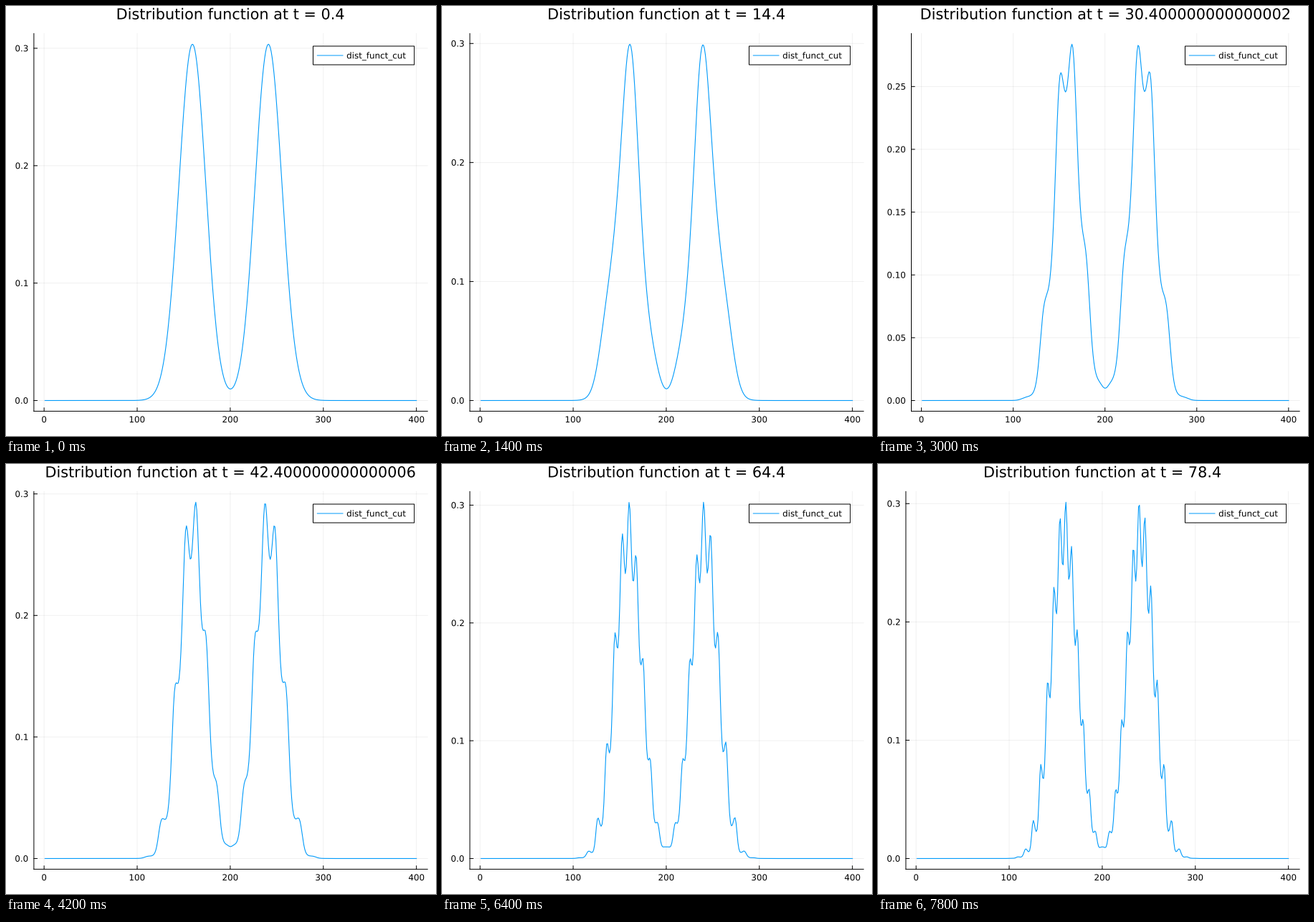
Animation of 600x600 px, one loop 8000 ms. Source, as a matplotlib script:

```python
import numpy as np
import matplotlib.pyplot as plt
from matplotlib.animation import FuncAnimation
from matplotlib.patches import PathPatch, Rectangle
from matplotlib.path import Path
from matplotlib.textpath import TextPath

plt.rcParams["font.family"] = "DejaVu Sans"

SIZE, DPI = 600, 100
FRAMES, INTERVAL = 40, 200
BLUE = "#009AFA"

# Two counter-streaming relativistic beams with a small density ripple.
BEAM_V, TEMP, DENSITY = 0.2, 0.005, 0.1
RIPPLE = 0.1
K = 0.8 * np.pi
X_CUT = -0.008
DT = 0.1
STRIDE = 20
GAMMA = 1 / np.sqrt(1 - BEAM_V**2)
PEAK = DENSITY / (2 * GAMMA * np.sqrt(2 * np.pi * TEMP) * (1 + 3 * TEMP / 8))

INDEX = np.arange(1, 401)
P = (INDEX - 200.2) * 0.005


def speed(p):
    return p / np.sqrt(1 + p * p)


def beams(p):
    energy = np.sqrt(1 + p * p)
    return PEAK * sum(
        np.exp(-(GAMMA * (energy - s * BEAM_V * p) - 1) / TEMP) for s in (-1, 1)
    )


def density_mode(steps):
    """Amplitude of the density ripple over time (linear response)."""
    p = np.linspace(-1, 1, 801)
    dp = p[1] - p[0]
    f = beams(p)
    phase = K * np.outer(np.arange(steps + 1) * DT, speed(p))
    free = RIPPLE * np.cos(phase) @ f * dp
    kernel = np.sin(phase) @ np.gradient(f, dp) * dp / K
    mode = free.copy()
    for i in range(1, steps + 1):
        past = mode[:i] * kernel[i:0:-1]
        mode[i] += DT * (past.sum() - past[0] / 2)
    return mode


FORCE = density_mode(STRIDE * (FRAMES - 1)) / K


def cut(steps):
    """Distribution at X_CUT, found by tracing particles back to the start."""
    x = np.full(P.shape, X_CUT)
    p = P.copy()
    kick = FORCE[steps] * np.sin(K * x)
    for i in range(steps - 1, -1, -1):
        p -= kick * DT / 2
        x -= speed(p) * DT
        kick = FORCE[i] * np.sin(K * x)
        p -= kick * DT / 2
    return beams(p) * (1 + RIPPLE * np.cos(K * x))


CURVES = [cut(STRIDE * i) for i in range(FRAMES)]

fig = plt.figure(figsize=(SIZE / DPI, SIZE / DPI), dpi=DPI, facecolor="white")
ax = fig.add_axes([0, 0, 1, 1])

TOP, BOTTOM, RIGHT = 38.4, 565.4, 588.2


def pt(px):
    return px * 72 / DPI


def line(x, y, color="black", width=1.0, **kw):
    ax.plot(x, y, color=color, lw=pt(width), snap=False, **kw)


def label(x, y, text, size=11.9, align=0.5):
    """Text as outlines; align 0, 0.5, 1 puts its left, middle or right at x."""
    glyphs = TextPath((0, 0), text, size=size)
    box = glyphs.get_extents()
    shift = x - box.x0 - align * box.width
    verts = glyphs.vertices * [1, -1] + [shift, y]
    ax.add_patch(PathPatch(Path(verts, glyphs.codes), fc="black", lw=0,
                           snap=False, zorder=6))


def draw_legend():
    ax.add_patch(Rectangle((428.5, 56), 141.2, 26, fc="white", ec="black",
                           lw=pt(1), snap=False, zorder=4))
    line([434.3, 470], [69, 69], BLUE, zorder=5)
    label(475.8, 73.3, "dist_funct_cut", align=0)


def draw(i):
    ax.clear()
    ax.set_xlim(0, SIZE)
    ax.set_ylim(SIZE, 0)
    ax.axis("off")

    f = CURVES[i]
    high = f.max()
    coarse = 1.03 * high >= 0.3
    step, digits, left = (0.1, 1, 38.9) if coarse else (0.05, 2, 46.5)

    def px(x):
        return left + (x + 10.97) / 422.94 * (RIGHT - left)

    def py(y):
        return BOTTOM - (y / high + 0.03) / 1.06 * (BOTTOM - TOP)

    for x in range(0, 401, 100):
        line([px(x)] * 2, [TOP, BOTTOM], alpha=0.06)
        line([px(x)] * 2, [BOTTOM, BOTTOM - 4.6])
        label(px(x), 581.1, str(x))
    for n in range(int(1.03 * high / step) + 1):
        y = py(n * step)
        line([left, RIGHT], [y, y], alpha=0.06)
        line([left, left + 4.6], [y, y])
        label(left - 8.5, y + 4.35, f"{n * step:.{digits}f}", align=1)

    line([left, RIGHT], [BOTTOM, BOTTOM])
    line([left, left], [TOP, BOTTOM])
    line(px(INDEX), py(f), BLUE, 1.1, zorder=3)
    draw_legend()

    time = 0.4 * (1 + 5 * i)
    label((left + RIGHT) / 2, 18.5, f"Distribution function at t = {time}", 20.8)
    return []


anim = FuncAnimation(fig, draw, frames=FRAMES, interval=INTERVAL,
                     repeat=True, repeat_delay=0, blit=False)
plt.show()
```
